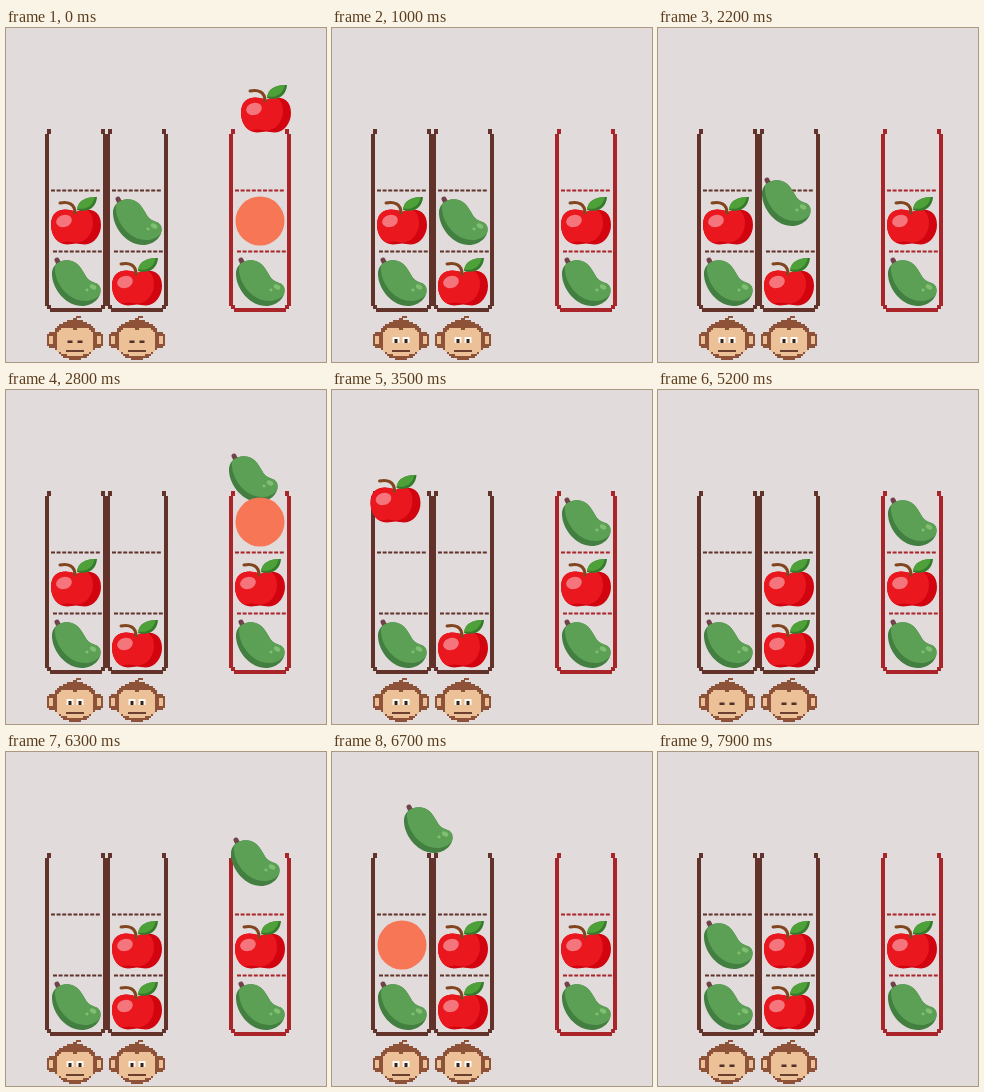
An HTML page with a canvas for the animation above (8 s loop, 320 by 334 pixels).

```html
<!DOCTYPE html>
<html lang="en">
<head>
<meta charset="utf-8">
<title>Fruit sorting</title>
<style>
  html, body { margin: 0; width: 100%; height: 100%; overflow: hidden; background: #e1dbdb; }
  canvas { display: block; width: 320px; height: 334px; }
</style>
</head>
<body>
<canvas id="stage" width="320" height="334"></canvas>
<script>
const ctx = document.getElementById('stage').getContext('2d');
const LOOP = 8000, STEP = 100;
const COLUMNS = [70, 131, 254], ROWS = [254, 193, 132];
const BROWN = '#61332b', RED = '#a9252a', FUR = '#8d5238', SKIN = '#ecc197';

function rect(x, y, w, h, color) {
  ctx.fillStyle = color;
  ctx.fillRect(x, y, w, h);
}

function ellipse(x, y, rx, ry, color, turn = 0) {
  ctx.fillStyle = color;
  ctx.beginPath();
  ctx.ellipse(x, y, rx, ry, turn, 0, 7);
  ctx.fill();
}

function fill(path, color) {
  ctx.fillStyle = color;
  ctx.fill(path);
}

function stroke(path, color, width) {
  ctx.strokeStyle = color;
  ctx.lineWidth = width;
  ctx.lineCap = 'round';
  ctx.stroke(path);
}

// Paints a shape, then a shifted copy clipped to it, leaving a shaded rim
function shaded(path, dark, light, dx, dy) {
  fill(path, dark);
  ctx.save();
  ctx.clip(path);
  ctx.translate(dx, dy);
  fill(path, light);
  ctx.restore();
}

const appleBody = new Path2D('M0-9C-8-13-25-14-25 4C-25 15-18 23.5-9 23.5C-5 23.5-3 22.5 0 22.5C3 22.5 5 23.5 9 23.5C18 23.5 25 14 25 4C25-14 8-13 0-9Z');
const appleStem = new Path2D('M-16-18C-8-20-1-17-1-8');
const appleLeaf = new Path2D('M1-11C2-22 12-24 21-24C20-13 12-8 1-11Z');
const mangoBody = new Path2D('M-24-7C-25-19-13-24-4-21C5-18 7-9 12-3C16 1 22 0 24 5C27 14 18 24 6 24C-9 24-23 9-24-7Z');
const mangoStem = new Path2D('M-19-22L-17-18');

function apple() {
  shaded(appleBody, '#d1040f', '#ea171f', -8, -2);
  ellipse(-12, 0, 8, 6, '#f4757b', -0.3);
  stroke(appleStem, '#81461f', 3);
  shaded(appleLeaf, '#347b2c', '#4ea138', -2, -2);
}

function mango() {
  stroke(mangoStem, '#72424a', 5);
  shaded(mangoBody, '#447f42', '#5ba055', 3, -5);
  ellipse(17, 5, 3.5, 2.3, '#80be72', 0.5);
  ellipse(11, 8, 1.6, 1.4, '#80be72');
}

// Each path lists [time, x, y]; a fruit rests before and after its moves
const fruits = [
  { draw: mango, path: [[0, 70, 254]] },
  { draw: apple, path: [[0, 131, 254]] },
  { draw: mango, path: [[0, 254, 254]] },
  { draw: apple, path: [[0, 260, 81], [300, 256, 87], [400, 254, 105], [600, 254, 193]] },
  { draw: apple, path: [[3250, 70, 193], [3400, 65, 145], [3600, 62, 73], [3700, 80, 59], [4000, 131, 85], [4250, 131, 96], [4500, 131, 193]] },
  { draw: mango, path: [
    [2050, 131, 193], [2200, 128, 174], [2450, 135, 85], [2600, 175, 68], [2800, 247, 88], [3000, 254, 97], [3150, 254, 132],
    [6000, 254, 132], [6300, 249, 110], [6450, 205, 63], [6700, 96, 77], [7000, 74, 88], [7250, 70, 94], [7500, 70, 193]] },
];

const isSlot = (x, y) => COLUMNS.includes(x) && ROWS.includes(y);

function place(path, t) {
  const next = path.findIndex(p => p[0] > t);
  if (next === 0) return path[0].slice(1);
  if (next < 0) return path[path.length - 1].slice(1);
  const [t0, x0, y0] = path[next - 1], [t1, x1, y1] = path[next];
  const k = (t - t0) / (t1 - t0);
  return [x0 + (x1 - x0) * k, y0 + (y1 - y0) * k];
}

// Column the fruit was last picked up from
function origin(path, t) {
  const left = path.filter(([time, x, y]) => time <= t && isSlot(x, y)).pop();
  return left ? COLUMNS.indexOf(left[1]) : -1;
}

function tube(cx, color) {
  for (const side of [-1, 1]) {
    ctx.save();
    ctx.translate(cx, 0);
    ctx.scale(side, 1);
    rect(27, 106, 4, 172, color);
    rect(25, 101, 4, 5, color);
    rect(25, 277, 4, 4, color);
    rect(0, 280, 26, 4, color);
    ctx.restore();
  }
  for (let x = -25; x < 25; x += 5.6) rect(cx + x, 161.5, 4, 2, color);
  for (let x = -23; x < 22; x += 5.6) rect(cx + x, 222.5, 4, 2, color);
}

const inside = (x, y, cx, cy, rx, ry) => ((x - cx) / rx) ** 2 + ((y - cy) / ry) ** 2 < 1;

function monkeyColor(x, y) {
  x = Math.abs(x);
  if (inside(x, y, 8, 309, 10, 9.5) || inside(x, y, 0, 319, 19, 9)) return SKIN;
  if (inside(x, y, 0, 311.5, 23, 20)) return FUR;
  if (inside(x, y, 24, 312, 2.5, 4)) return SKIN;
  if (inside(x, y, 23, 312, 6, 8)) return FUR;
}

function monkey(cx, closed) {
  for (let y = 288; y < 332; y += 2)
    for (let x = -30; x < 30; x += 2) {
      const color = monkeyColor(x + 1, y + 1);
      if (color) rect(cx + x, y, 2, 2, color);
    }
  rect(cx - 2, 290, 4, 2, FUR);
  rect(cx + 1, 288, 5, 2, FUR);
  for (const side of [-1, 1]) {
    const x = cx + side * 5;
    if (closed) rect(x - 2.5, 312.5, 5, 2.5, '#50322a');
    else {
      rect(x - 3.5, 309, 7, 6, '#fff8f0');
      rect(x - 1.5, 311, 3, 4, '#30231f');
    }
  }
  rect(cx - 9, 322, 18, 2, '#6b4030');
}

function draw(t) {
  rect(0, 0, 320, 334, '#e1dbdb');
  tube(70, BROWN);
  tube(131, BROWN);
  tube(254, RED);

  const blink = t % 2640;
  const closed = blink > 2450 || blink < 100;
  monkey(69, closed);
  monkey(131, closed);

  const items = fruits.map(({ draw, path }) => {
    const [x, y] = place(path, t);
    const column = COLUMNS.findIndex(c => Math.abs(c - x) < 31);
    return { draw, x, y, column, from: origin(path, t), resting: isSlot(x, y) };
  }).sort((a, b) => b.resting - a.resting);

  for (const { draw, x, y } of items) {
    ctx.save();
    ctx.translate(x, y);
    draw();
    ctx.restore();
  }
  // A disc marks the free slot below a held fruit
  for (const { resting, column, from, y } of items) {
    if (resting || column < 0 || column === from || y > 100) continue;
    const level = items.filter(o => o.resting && o.column === column).length;
    ellipse(COLUMNS[column], ROWS[level], 24.5, 24.5, '#f77655');
  }
}

function tick() {
  draw(Math.floor(performance.now() % LOOP / STEP) * STEP);
  requestAnimationFrame(tick);
}
tick();
</script>
</body>
</html>
```
